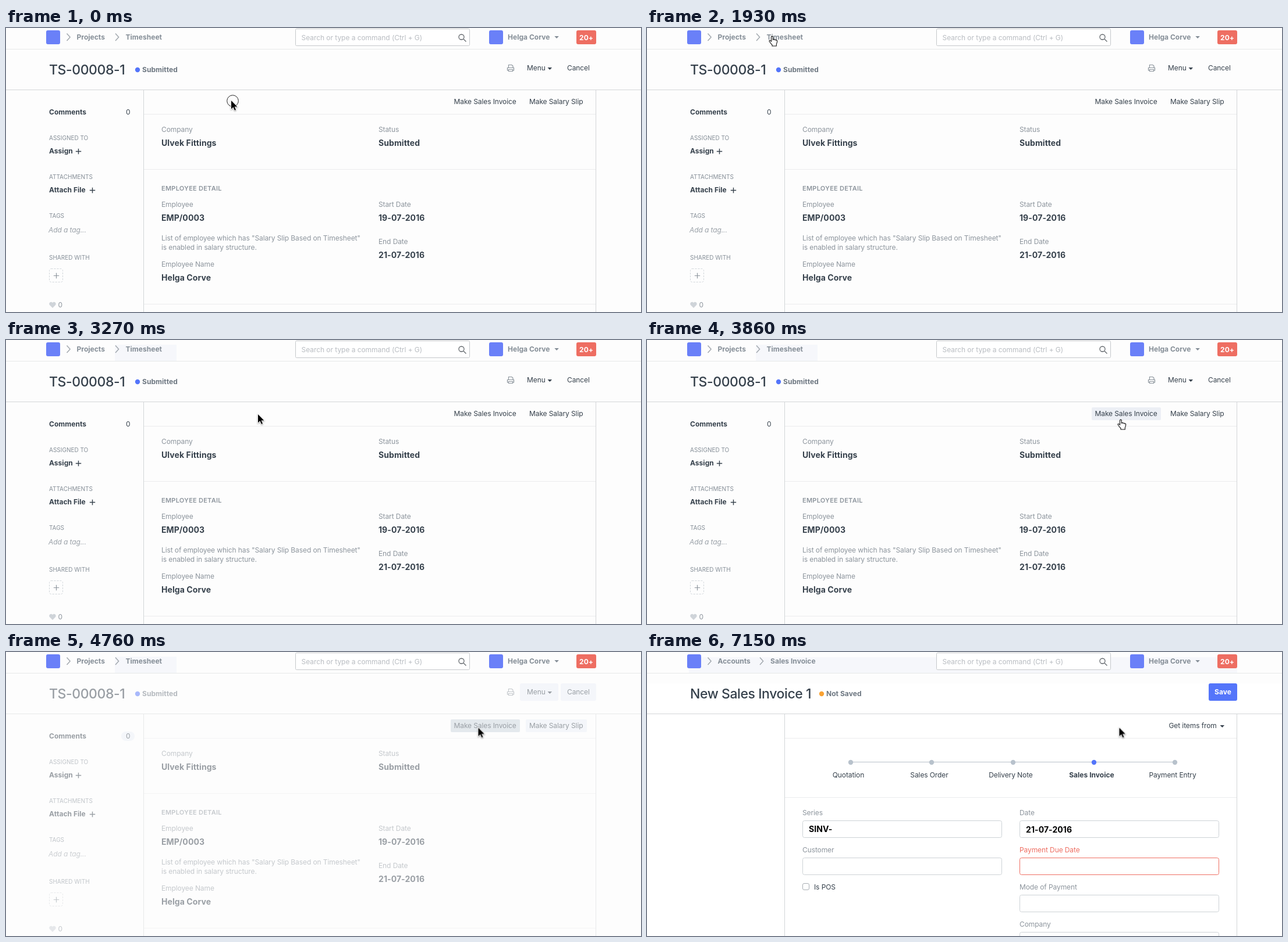
An HTML page that plays this animation: 1091x489 px, repeating every 8 s.

```html
<!DOCTYPE html>
<html lang="en">
<head>
<meta charset="utf-8">
<title>Timesheet to invoice</title>
<style>
html, body { margin: 0; width: 100%; height: 100%; overflow: hidden; background: #fdfdfd; }
svg { display: block; width: 1091px; height: 489px; }
text { font: 400 12px Inter, Roboto, "Open Sans", sans-serif; letter-spacing: -.1px; fill: #36414c; white-space: pre; }
.label { fill: #8d959d; }
.bold { font-weight: 700; letter-spacing: .03px; }
.value { font-weight: 700; font-size: 14px; letter-spacing: .08px; }
.nav { font-weight: 700; letter-spacing: .03px; fill: #858e97; }
.title { font-weight: 500; font-size: 23px; letter-spacing: -.42px; }
.state { font-weight: 700; letter-spacing: .05px; fill: #6c7680; }
.cap { font-size: 10px; letter-spacing: 0; fill: #858e97; }
.section { font-size: 11px; font-weight: 600; letter-spacing: .25px; fill: #8d959d; }
.hint { font-style: italic; fill: #9aa1a8; }
.mid { text-anchor: middle; }
.light { fill: #b9bdc2; letter-spacing: -.05px; }
.white { fill: #fff; }
.strong { fill: #000; }
.line { stroke: #d3d6d8; fill: none; }
.soft { stroke: #ebeced; fill: none; }
.box { fill: #fff; stroke: #cdd2d6; }
.plus { fill: none; stroke: #36414c; stroke-width: 1.4; }
.chev { fill: none; stroke: #a3a9af; stroke-width: 1.5; }
.icon { fill: none; stroke: #8d959d; stroke-width: 1.2; }

/* every change is a hard step on one 8 s clock */
.step { animation: 8s step-end infinite; }
.first { animation-name: first; }
.second { animation-name: second; }
.trail { animation-name: trail; }
.tint { animation-name: tint; fill: #ebf0f7; }
.hot { animation-name: hot; }
.veil { animation-name: veil; fill: #fdfdfd; }
.paper { animation-name: paper; }
.due { animation-name: due; }
.ring { animation-name: ring; }
.cursor { animation-name: move; }
.arrow { animation-name: arrow; }
.hand { animation-name: hand; }
.beam { animation-name: beam; }

@keyframes first { 0% { opacity: 1 } 85.75%, 100% { opacity: 0 } }
@keyframes second { 0% { opacity: 0 } 85.75%, 100% { opacity: 1 } }
@keyframes trail { 0% { opacity: 0 } 26%, 100% { opacity: 1 } }
@keyframes tint { 0% { opacity: 0 } 55.75% { opacity: 1 } 89.375%, 100% { opacity: 0 } }
@keyframes hot {
  0% { opacity: 0; fill: #eceff5 }
  48.25% { opacity: 1; fill: #eceff5 }
  55.75%, 100% { opacity: 1; fill: #cbd5de }
}
@keyframes veil {
  0% { opacity: 0 } 55.75% { opacity: .15 } 57.625% { opacity: .35 } 59.5% { opacity: .5 }
  87.5% { opacity: .25 } 89.375%, 100% { opacity: 0 }
}
@keyframes paper { 0% { fill: #fdfdfd } 89.375%, 100% { fill: #fff } }
@keyframes due { 0% { stroke: #cdd2d6 } 89.375%, 100% { stroke: #ee6e62 } }
@keyframes ring { 0% { opacity: 1 } 1.875%, 100% { opacity: 0 } }
@keyframes move {
  0% { transform: translate(387px, 125px) }
  16.75% { transform: translate(382px, 120px) }
  18.625% { transform: translate(354px, 88px) }
  20.5% { transform: translate(322px, 66px) }
  22.25% { transform: translate(281px, 36px) }
  24.125% { transform: translate(215px, 14px) }
  26% { transform: translate(188px, 9px) }
  29.75% { transform: translate(209px, 18px) }
  31.625% { transform: translate(240px, 40px) }
  33.5% { transform: translate(272px, 68px) }
  37.25% { transform: translate(279px, 75px) }
  39.125% { transform: translate(310px, 100px) }
  40.875% { transform: translate(433px, 128px) }
  42.75% { transform: translate(618px, 158px) }
  44.625% { transform: translate(723px, 160px) }
  46.375% { transform: translate(784px, 150px) }
  48.25% { transform: translate(814px, 137px) }
  50.125% { transform: translate(813px, 132px) }
  52%, 100% { transform: translate(811.5px, 130.5px) }
}
@keyframes arrow {
  0% { opacity: 1 } 24.125% { opacity: 0 } 26% { opacity: 1 } 29.75% { opacity: 0 } 31.625% { opacity: 1 }
  33.5% { opacity: 0 } 37.25% { opacity: 1 } 48.25% { opacity: 0 } 52%, 100% { opacity: 1 }
}
@keyframes hand {
  0% { opacity: 0 } 24.125% { opacity: 1 } 26% { opacity: 0 } 29.75% { opacity: 1 } 31.625% { opacity: 0 }
  48.25% { opacity: 1 } 52%, 100% { opacity: 0 }
}
@keyframes beam { 0% { opacity: 0 } 33.5% { opacity: 1 } 37.25%, 100% { opacity: 0 } }
</style>
</head>
<body>
<svg viewBox="0 0 1091 489">
  <defs>
    <path id="caret" d="M0 0h7.6l-3.8 4z"/>
    <path id="chev" class="chev" d="M0 0l5.6 6.2-5.6 6.2"/>
    <path id="plus" d="M-4.7 0h9.4M0-4.7v9.4"/>
  </defs>

  <rect width="1091" height="489" fill="#fdfdfd"/>
  <rect class="step paper" y="54" width="1091" height="435"/>

  <!-- timesheet -->
  <g class="step first">
    <text class="title" x="74" y="80">TS-00008-1</text>
    <circle cx="226" cy="72" r="4.2" fill="#5475fa"/>
    <text class="state" x="234" y="76">Submitted</text>

    <g class="step tint">
      <rect x="883" y="54" width="66" height="30" rx="3"/>
      <rect x="953" y="54" width="61" height="30" rx="3"/>
      <rect x="893" y="116" width="105" height="22" rx="2"/>
      <rect x="198" y="137" width="23" height="16" rx="8"/>
    </g>
    <rect class="step hot" x="764" y="116" width="119" height="22" rx="2"/>

    <path class="icon" d="M863.5 68v-4.500h5.500l2 2v2.500M863 73h-1.500v-4.500h11v4.500H871M863.500 71.500h7v3h-7z"/>
    <text x="895" y="73">Menu</text>
    <use href="#caret" x="930.500" y="68" fill="#36414c"/>
    <text x="964" y="73">Cancel</text>
    <text x="769.500" y="131">Make Sales Invoice</text>
    <text x="899" y="131">Make Salary Slip</text>

    <text class="bold" x="74" y="149">Comments</text>
    <text x="206" y="149">0</text>
    <text class="cap" x="74" y="193">ASSIGNED TO</text>
    <text class="bold" x="74" y="216">Assign</text>
    <use href="#plus" class="plus" x="124.500" y="212.500"/>
    <text class="cap" x="74" y="260">ATTACHMENTS</text>
    <text class="bold" x="74" y="283">Attach File</text>
    <use href="#plus" class="plus" x="148.500" y="279.500"/>
    <text class="cap" x="74" y="327">TAGS</text>
    <text class="hint" x="73" y="352">Add a tag...</text>
    <text class="cap" x="74" y="399">SHARED WITH</text>
    <rect x="74.500" y="414.500" width="23" height="23" rx="3" fill="none" stroke="#d1d6da" stroke-dasharray="3 2"/>
    <use href="#plus" class="icon" x="86.500" y="426.500"/>
    <path d="M80 482l-5-5c-2.500-3.500 2-7.500 5-4 3-3.500 7.500.5 5 4z" fill="#cfd4d9"/>
    <text class="label" x="89.500" y="481">0</text>

    <path class="soft" d="M237 148.500h776M237 243.500h776M237 475.500h776"/>
    <text class="label" x="267" y="179">Company</text>
    <text class="value" x="267" y="203">Ulvek Fittings</text>
    <text class="label" x="640" y="179">Status</text>
    <text class="value" x="640" y="203">Submitted</text>
    <text class="section" x="267" y="280">EMPLOYEE DETAIL</text>
    <text class="label" x="267" y="308">Employee</text>
    <text class="value" x="267" y="332">EMP/0003</text>
    <text class="label" x="267" y="366">List of employee which has "Salary Slip Based on Timesheet"</text>
    <text class="label" x="267" y="382">is enabled in salary structure.</text>
    <text class="label" x="267" y="411">Employee Name</text>
    <text class="value" x="267" y="435">Helga Corve</text>
    <text class="label" x="640" y="308">Start Date</text>
    <text class="value" x="640" y="332">19-07-2016</text>
    <text class="label" x="640" y="372">End Date</text>
    <text class="value" x="640" y="396">21-07-2016</text>
  </g>

  <!-- new invoice -->
  <g class="step second">
    <text class="title" x="74" y="80">New Sales Invoice 1</text>
    <circle cx="300" cy="72" r="4.2" fill="#f9a233"/>
    <text class="state" x="308" y="76">Not Saved</text>
    <rect x="965" y="54" width="49" height="30" rx="3" fill="#5475fa"/>
    <text class="bold white mid" x="989.500" y="73">Save</text>
    <rect class="step tint" x="891" y="116" width="107" height="22" rx="2"/>
    <text x="896.500" y="131">Get items from</text>
    <use href="#caret" x="984.500" y="126" fill="#36414c"/>
    <path class="soft" d="M237 148.500h776M237 250.500h776"/>

    <path d="M350 189.500h557" stroke="#b9c1c9"/>
    <g fill="#b8c2cc">
      <circle cx="350" cy="190" r="4.200"/>
      <circle cx="489" cy="190" r="4.200"/>
      <circle cx="629" cy="190" r="4.200"/>
      <circle cx="768" cy="190" r="4.200" fill="#5475fa"/>
      <circle cx="907" cy="190" r="4.200"/>
    </g>
    <text class="mid" x="346" y="216">Quotation</text>
    <text class="mid" x="485" y="216">Sales Order</text>
    <text class="mid" x="625" y="216">Delivery Note</text>
    <text class="mid bold" x="764" y="216">Sales Invoice</text>
    <text class="mid" x="903" y="216">Payment Entry</text>

    <g class="box">
      <rect x="267.500" y="290.500" width="342" height="29" rx="3"/>
      <rect x="267.500" y="354.500" width="342" height="29" rx="3"/>
      <rect x="640.500" y="290.500" width="342" height="29" rx="3"/>
      <rect class="step due" x="640.500" y="354.500" width="342" height="29" rx="3"/>
      <rect x="640.500" y="418.500" width="342" height="29" rx="3"/>
      <rect x="640.500" y="482.500" width="342" height="29" rx="3"/>
      <rect x="267.500" y="398.500" width="11" height="11" rx="2.500" stroke="#a9aeb3"/>
    </g>
    <text class="label" x="267" y="281">Series</text>
    <text class="value strong" x="278" y="310">SINV-</text>
    <text class="label" x="267" y="345">Customer</text>
    <text x="287" y="409">Is POS</text>
    <text class="label" x="640" y="281">Date</text>
    <text class="value strong" x="651" y="311">21-07-2016</text>
    <text x="640" y="345" style="fill:#ee6e62">Payment Due Date</text>
    <text class="label" x="640" y="409">Mode of Payment</text>
    <text class="label" x="640" y="473">Company</text>
  </g>

  <path class="line" d="M0 106.500h1091M236.500 107v382M1013.500 107v382"/>
  <rect class="step veil" y="37" width="1091" height="452"/>

  <!-- top bar -->
  <path d="M0 36.500h1091" stroke="#e7e8e9"/>
  <g class="step first">
    <rect class="step trail" x="187" y="8" width="106" height="28" fill="#f6f7fb"/>
    <text class="nav" x="121.500" y="20">Projects</text>
    <use href="#chev" x="188" y="9.500"/>
    <text class="nav" x="205.500" y="20">Timesheet</text>
  </g>
  <g class="step second">
    <rect x="72" y="9" width="942" height="27" fill="#f6f7fb"/>
    <text class="nav" x="121.500" y="20">Accounts</text>
    <use href="#chev" x="194" y="9.500"/>
    <text class="nav" x="212" y="20">Sales Invoice</text>
  </g>
  <use href="#chev" x="104.500" y="9.500"/>
  <rect x="69" y="4" width="24" height="24" rx="3" fill="#6a80f8"/>
  <rect x="497.500" y="1.500" width="299" height="29" rx="2" fill="#fff" stroke="#c5c8cb"/>
  <text class="light" x="507.500" y="21">Search or type a command (Ctrl + G)</text>
  <g fill="none" stroke="#62676c" stroke-width="1.300">
    <circle cx="782.500" cy="15.500" r="4.500"/>
    <path d="M786 19l4.500 4.500"/>
  </g>
  <rect x="830" y="4" width="24" height="24" rx="3" fill="#6a80f8"/>
  <text class="nav" x="862" y="20">Helga Corve</text>
  <use href="#caret" x="942.300" y="14" fill="#858e97"/>
  <rect x="980" y="4" width="34" height="24" rx="3" fill="#ee6e62"/>
  <text class="bold white mid" x="997" y="20.500">20+</text>

  <!-- pointer -->
  <circle class="step ring" cx="389.500" cy="125.500" r="9.800" fill="none" stroke="#222"/>
  <g class="step cursor">
    <path class="step arrow" d="M0 0V14.500L3.400 11.300 5.900 16.800 8 15.900 5.600 10.500H10.300Z" stroke="#fff" paint-order="stroke" stroke-width="1.600" style="filter:drop-shadow(0 1px 1px #0006)"/>
    <path class="step hand" d="M-1.500 9V1.500a1.400 1.400 0 0 1 2.800 0V6c.6-1 2.500-.8 2.700.4.800-.8 2.400-.4 2.500.7 1-.5 2.200 0 2.200 1.200 0 3-.6 4.200-1.400 5.800V17H0v-2c-1.800-1.600-3.200-3.600-4.700-5.800-1-1.600.6-2.600 1.800-1.400z" fill="#fff" stroke="#111" stroke-width="1.100"/>
    <path class="step beam" d="M-3-7c2 0 3 .5 3 2 0-1.500 1-2 3-2M0-5V5M-3 7c2 0 3-.5 3-2 0 1.500 1 2 3 2M-2 1h4" fill="none" stroke="#222" stroke-width="1.100"/>
  </g>
</svg>
</body>
</html>
```
